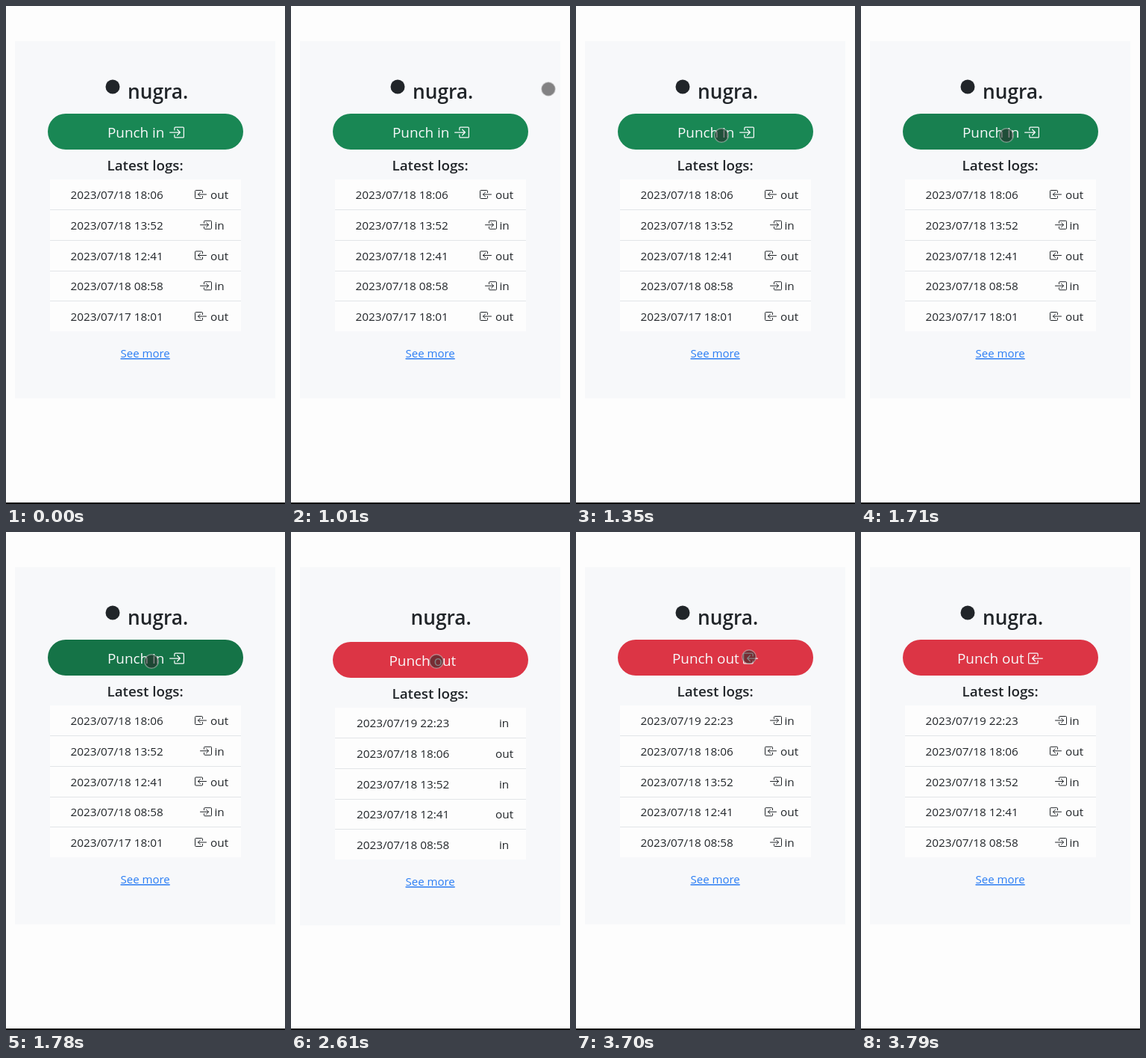
Animation of 374x666 px, one loop 3.86 s. Source, as an HTML page:

```html
<!DOCTYPE html>
<html lang="en">
<head>
<meta charset="utf-8">
<title>Punch clock</title>
<style>
  html, body { margin: 0; width: 100%; height: 100%; overflow: hidden; background: #fdfdfd; }
  svg { display: block; width: 374px; height: 666px; font-family: "Open Sans", "Noto Sans", sans-serif; }
</style>
</head>
<body>
<svg id="stage" viewBox="0 0 374 666"></svg>
<script>
const LOOP = 3860;
const stage = document.getElementById('stage');
const logs = ['2023/07/19 22:23', '2023/07/18 18:06', '2023/07/18 13:52',
  '2023/07/18 12:41', '2023/07/18 08:58', '2023/07/17 18:01'];
const green = [25, 135, 84], darkGreen = [21, 115, 71], red = '#dc3545';
const ink = '#212529', pale = '#f8f9fa';

const mix = (a, b, p) => a + (b - a) * p;
const rgb = (a, b, p) => `rgb(${a.map((v, i) => mix(v, b[i], p))})`;
const rect = (x, y, w, h, fill, r = 0) =>
  `<rect x="${x}" y="${y}" width="${w}" height="${h}" rx="${r}" fill="${fill}"/>`;
const text = (s, x, y, size, fill, extra = '') =>
  `<text x="${x}" y="${y}" font-size="${size}" fill="${fill}" ${extra}>${s}</text>`;

// Door box with an arrow; mirrored for "out"
function icon(x, y, size, color, out) {
  const k = size / 16;
  const place = out ? `translate(${x + size} ${y}) scale(${-k} ${k})` : `translate(${x} ${y}) scale(${k})`;
  return `<path transform="${place}" fill="none" stroke="${color}" stroke-linecap="round" stroke-linejoin="round"
    d="M5.5 5.5v-2a1 1 0 0 1 1-1h8a1 1 0 0 1 1 1v9a1 1 0 0 1-1 1h-8a1 1 0 0 1-1-1v-2M.5 8h11m-3-3 3 3-3 3"/>`;
}

function pointer(t) {
  if (t < 1010 || t >= 3790) return '';
  let x = 195, y = 173;
  if (t < 1350) {
    const p = Math.floor((t - 1010) / 34) / 10;
    const e = 1 - (1 - p) ** 2;
    x = mix(345, x, e);
    y = mix(111, y, e);
  } else if (t >= 3700) {
    [x, y] = t < 3740 ? [232, 167] : [309, 155];
  }
  return `<circle cx="${x}" cy="${y}" r="9.3" fill="rgba(38,38,38,.56)"
    stroke="rgba(205,205,205,.5)" stroke-width="1.5"/>`;
}

function draw(t) {
  const punched = t >= 2610;
  const loading = punched && t < 2750; // icons not there yet
  const dy = loading ? 3 : 0;
  const press = t < 1710 ? 0 : t < 1740 ? 1 / 3 : t < 1780 ? 2 / 3 : 1;
  const fill = punched ? red : rgb(green, darkGreen, press);

  let s = rect(12, 47, 349, 477.5 + dy / 2, '#f7f8fa');
  if (!loading) s += `<circle cx="143" cy="108" r="9.5" fill="${ink}"/>`;
  s += text('nugra.', loading ? 160.5 : 163, 124, 26.3, ink, 'font-weight="600"');

  s += rect(56, 144 + dy, 262, 48, fill, 24);
  s += text(punched ? 'Punch out' : 'Punch in', loading ? 131.5 : punched ? 129 : 136, 176 + dy, 18.9, pale);
  if (!loading) s += icon(punched ? 224 : 219, 159, 20, pale, punched);

  s += text('Latest logs:', 135.5, 220 + dy, 18.8, ink, 'font-weight="600"');
  s += rect(59, 232 + dy, 256, 203, '#fdfdfd');
  const first = punched ? 0 : 1;
  for (let i = 0; i < 5; i++) {
    const n = first + i, out = n % 2 === 1, y = 252.5 + dy + i * 40.75;
    s += text(logs[n], loading ? 88 : 86.5, y + 5.5, 15.3, ink);
    s += text(out ? 'out' : 'in', out ? 274 : loading ? 279 : 279.5, y + 5.5, 15.3, ink);
    if (!loading) s += icon(out ? 253 : 260, y - 8.5, 16, ink, out);
    if (i < 4) s += rect(59, Math.round(y + 19.5), 256, 1, '#e2e5e8');
  }
  s += text('See more', 153.5, 470 + dy, 15, '#2a7df4', 'text-decoration="underline"');
  s += rect(0, 664, 374, 2, '#0a0a0a');
  stage.innerHTML = s + pointer(t);
}

const start = performance.now();
function tick() {
  draw((performance.now() - start) % LOOP);
  requestAnimationFrame(tick);
}
tick();
</script>
</body>
</html>
```
